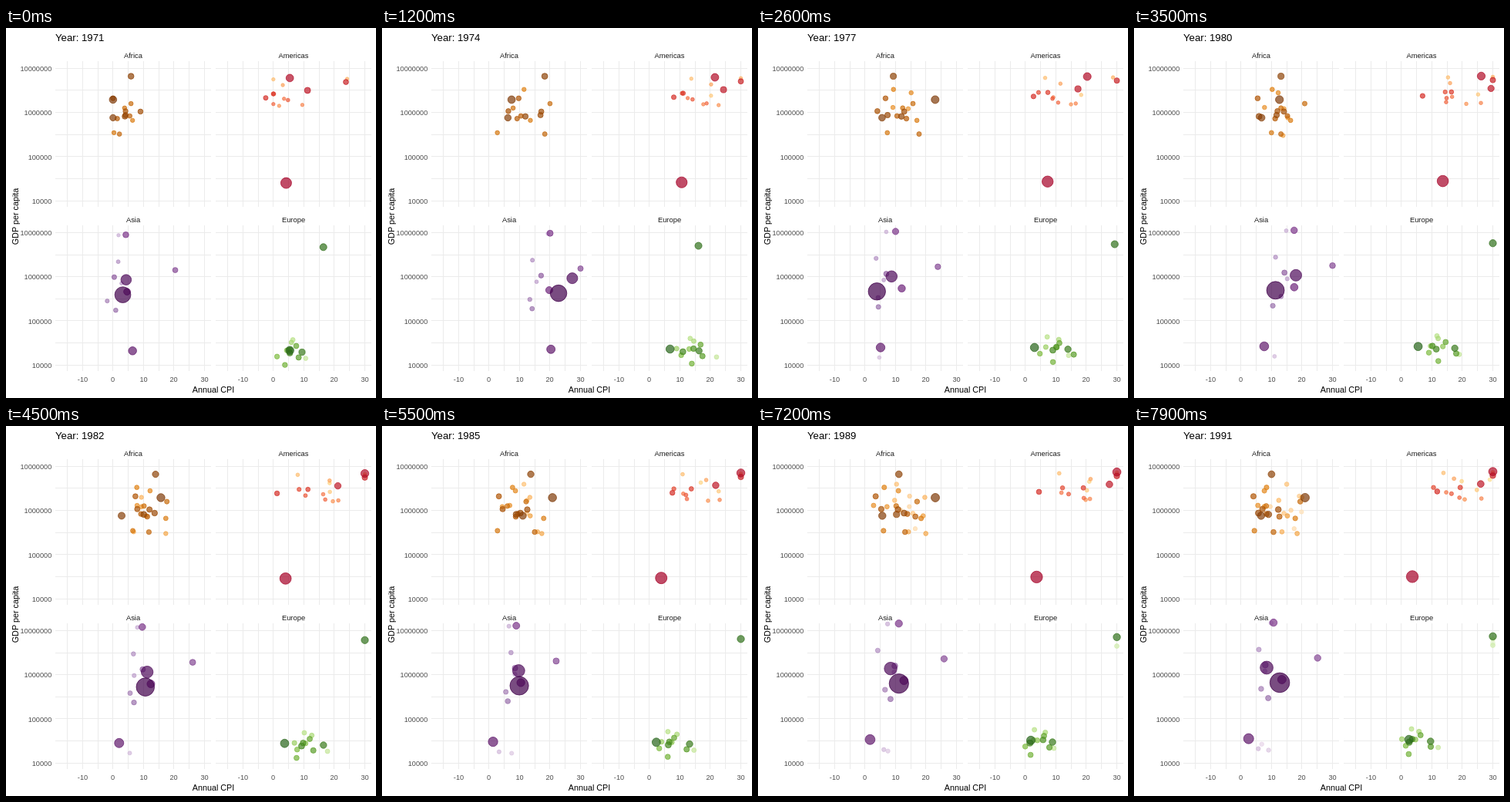
Animation of 480 by 480 pixels, one loop 8 s. Source, as an HTML page:

```html
<!DOCTYPE html>
<html lang="en">
<head>
<meta charset="utf-8">
<title>GDP per capita and CPI by year</title>
<style>
  html, body { margin: 0; width: 100%; height: 100%; overflow: hidden; background: #fff; }
  svg { display: block; width: 100vw; height: 100vh; font-family: "Liberation Sans", Arial, sans-serif; }
  .grid { stroke: #ebebeb; stroke-width: 1; shape-rendering: crispEdges; }
  .tick { font-size: 9.2px; fill: #4d4d4d; }
  .strip { font-size: 9.4px; fill: #1a1a1a; text-anchor: middle; }
  .axis { font-size: 10.8px; text-anchor: middle; }
  .title { font-size: 13.2px; }
  circle { fill-opacity: .7; stroke-opacity: .7; stroke-width: 1; }
</style>
</head>
<body>
<svg id="chart" viewBox="0 0 480 480"></svg>
<script>
const chart = document.getElementById('chart');
const STEP = 100, STEPS = 80, YEARS_PER_STEP = 0.248;
const KEYS = [0, 12, 26, 35, 45, 64, 79];   // steps of the key values in trend and paths
const LEFT = 64, RIGHT = 272, TOP = 43, BOTTOM = 256.1;

// Dots are [inflation %, log10 of GDP], largest population first.
// Those with an entry in paths follow it; the others wander around the trend.
const regions = [
  {
    name: 'Africa', left: LEFT, top: TOP,
    ramp: [0x7f3b08, 0xb35806, 0xe08214, 0xfdb863, 0xfee0b6],
    radius: 5, falloff: 0.2, swell: 0.15, growth: 0, spread: 11,
    trend: [4, 14, 12, 14, 11, 13, 12],
    dots: [[0, 6.29], [0, 5.88], [5.9, 6.82], [3.9, 5.91], [4.1, 5.94], [9, 6.02], [4.1, 6.03], [0, 6.32],
      [1.4, 5.86], [5.5, 5.92], [2.1, 5.51], [5.9, 6.2], [3.8, 6.1], [0.3, 5.54], [6.4, 5.82]],
    paths: [[0, 7.4, 23, 12.6, 15.7, 25.4, 21]],
    late: { count: 16, from: 10, inflation: 4, low: 5.45, high: 6.6 },
  },
  {
    name: 'Americas', left: RIGHT, top: TOP,
    ramp: [0xa50026, 0xd73027, 0xf46d43, 0xfdae61, 0xfee090],
    radius: 7.2, falloff: 0.5, swell: 0.1, growth: 0.1, spread: 9,
    trend: [5, 18, 13, 20, 17, 19, 20],
    dots: [[4.2, 4.4], [5.4, 6.78], [11.2, 6.5], [23.8, 6.69], [-2.5, 6.33], [0, 6.42], [0.1, 6.42], [4.8, 6.28],
      [0, 6.19], [3.5, 6.31], [9.5, 6.17], [1.9, 6.15], [3.1, 6.62], [24.2, 6.76], [0, 6.75]],
    paths: [[4.2, 10.6, 7.3, 13.6, 4, 3.8, 3.6], [5.4, 21.5, 20.3, 26.2, 30, 30, 30]],
    late: { count: 3, from: 12, inflation: 10, low: 6.3, high: 6.7 },
  },
  {
    name: 'Asia', left: LEFT, top: BOTTOM,
    ramp: [0x40004b, 0x762a83, 0x9970ab, 0xc2a5cf, 0xe7d4e8],
    radius: 10.6, falloff: 0.6, swell: 0.23, growth: 0.23, spread: 5,
    trend: [4, 18, 8, 15, 9, 8, 11],
    dots: [[3.2, 5.59], [4.3, 5.93], [6.4, 4.32], [4.6, 5.66], [4.2, 6.95], [20.4, 6.15], [0.4, 5.99],
      [0.9, 5.24], [-1.9, 5.45], [1.7, 6.34], [2.8, 5.85], [1.8, 6.94]],
    paths: [[3.2, 22.8, 3.9, 11.3, 10.6, 9.3, 12.7], [4.3, 27.3, 8.7, 18, 11.2, 8.4, 8.4],
      [6.4, 20.3, 5.1, 7.6, 2, 0.7, 2.5]],
    late: { count: 3, from: 22, inflation: 1, low: 4.05, high: 4.2 },
  },
  {
    name: 'Europe', left: RIGHT, top: BOTTOM,
    ramp: [0x276419, 0x4d9221, 0x7fbc41, 0xb8e186, 0xe6f5d0],
    radius: 5.5, falloff: 0.22, swell: 0.04, growth: 0.2, spread: 5,
    trend: [7, 15, 11, 14, 11, 5, 6],
    dots: [[5.4, 4.33], [16.4, 6.67], [9.4, 4.29], [5.4, 4.27], [5.4, 4.34], [8.3, 4.17], [7.5, 4.43],
      [3.8, 4], [1.2, 4.19], [4.4, 4.33], [4.9, 4.34], [5.9, 4.51], [6.4, 4.57], [10.6, 4.15]],
    paths: [[5.4, 6.8, 3, 5.5, 3.7, 1, 2.5], [16.4, 16.1, 29.3, 30, 30, 30, 30]],
    late: { count: 3, from: 72, inflation: 32, low: 6.4, high: 6.75 },
  },
];

const lerp = (a, b, f) => a + (b - a) * f;
const xOf = (region, inflation) => region.left + 74.84 + inflation * 3.956;
const yOf = (region, level) => region.top + 9.3 + (7 - level) * 57.24;

// Repeatable random number from 0 to 1.
function random(seed, n) {
  const v = Math.sin(seed * 12.9898 + n * 78.233) * 43758.5453;
  return v - Math.floor(v);
}

function along(values, step) {
  const i = Math.min(KEYS.findLastIndex(k => k <= step), KEYS.length - 2);
  return lerp(values[i], values[i + 1], (step - KEYS[i]) / (KEYS[i + 1] - KEYS[i]));
}

// A lasting bias plus yearly swings, from -1 to 1.
function wander(seed, years) {
  const year = Math.floor(years);
  const swing = lerp(random(seed, year), random(seed, year + 1), years - year);
  return random(seed, -1) + swing - 1;
}

function add(tag, attrs, text) {
  const node = document.createElementNS('http://www.w3.org/2000/svg', tag);
  for (const name in attrs) node.setAttribute(name, attrs[name]);
  if (text !== undefined) node.textContent = text;
  return chart.appendChild(node);
}

function shade(ramp, tone) {
  const i = Math.min(Math.floor(tone * 4), 3);
  const channel = shift => Math.round(lerp(ramp[i] >> shift & 255, ramp[i + 1] >> shift & 255, tone * 4 - i));
  return `rgb(${channel(16)},${channel(8)},${channel(0)})`;
}

const crisp = v => Math.floor(v) + 0.5;
const line = (x1, y1, x2, y2) => add('line', { x1, y1, x2, y2, class: 'grid' });

function drawPanel(region) {
  const { name, left, top } = region;
  for (let v = -15; v <= 30; v += 5) {
    const x = crisp(xOf(region, v));
    line(x, top, x, top + 189);
    if (top === BOTTOM && v % 10 === 0)
      add('text', { x, y: 459, class: 'tick', 'text-anchor': 'middle' }, v);
  }
  for (let level = 7; level >= 4; level -= 0.5) {
    const y = yOf(region, level);
    line(left, crisp(y), left + 202, crisp(y));
    if (left === LEFT && level % 1 === 0)
      add('text', { x: 59.3, y: y + 3.8, class: 'tick', 'text-anchor': 'end' }, 10 ** level);
  }
  add('text', { x: left + 101, y: top - 4.5, class: 'strip' }, name);
}

function makeDots(region, regionIndex) {
  const { dots, paths, late, ramp, radius, falloff } = region;
  const total = dots.length + late.count;
  const made = Array.from({ length: total }, (_, rank) => {
    const seed = regionIndex * 50 + rank + 1;
    const order = rank - dots.length;
    const [inflation, level] = dots[rank] || [late.inflation, lerp(late.low, late.high, random(seed, -2))];
    return {
      region, seed, inflation, level,
      path: paths[rank],
      birth: order < 0 ? 0 : lerp(late.from, 76, order / (late.count - 1)),
      radius: Math.max(2.4, radius * (rank + 1) ** -falloff),
      color: shade(ramp, rank / (total - 1)),
    };
  }).reverse();
  for (const dot of made) dot.node = add('circle', { fill: dot.color, stroke: dot.color });
  return made;
}

function inflationAt({ region, path, inflation, seed }, step) {
  if (path) return along(path, step);
  const shift = along(region.trend, step) - region.trend[0];
  const sway = region.spread * Math.min(1, step / 10) * wander(seed, step * YEARS_PER_STEP);
  return Math.min(30, inflation + shift + sway);
}

add('rect', { width: 480, height: 480, fill: '#fff' });
regions.forEach(drawPanel);
add('text', { x: 269, y: 473, class: 'axis' }, 'Annual CPI');
add('text', { transform: 'translate(15.5 244.5) rotate(-90)', class: 'axis' }, 'GDP per capita');
const title = add('text', { x: 64, y: 17, class: 'title' });
const dots = regions.flatMap(makeDots);

function draw(step) {
  const progress = step / (STEPS - 1);
  title.textContent = 'Year: ' + Math.round(1971 + step * YEARS_PER_STEP);
  for (const dot of dots) {
    const { node, region, level, radius, birth } = dot;
    node.setAttribute('visibility', step >= birth ? 'visible' : 'hidden');
    node.setAttribute('cx', xOf(region, inflationAt(dot, step)));
    node.setAttribute('cy', yOf(region, level + region.growth * progress));
    node.setAttribute('r', radius * (1 + region.swell * progress) - 0.2);
  }
}

const start = performance.now();
function tick() {
  draw(Math.floor((performance.now() - start) / STEP) % STEPS);
  requestAnimationFrame(tick);
}
tick();
</script>
</body>
</html>
```
